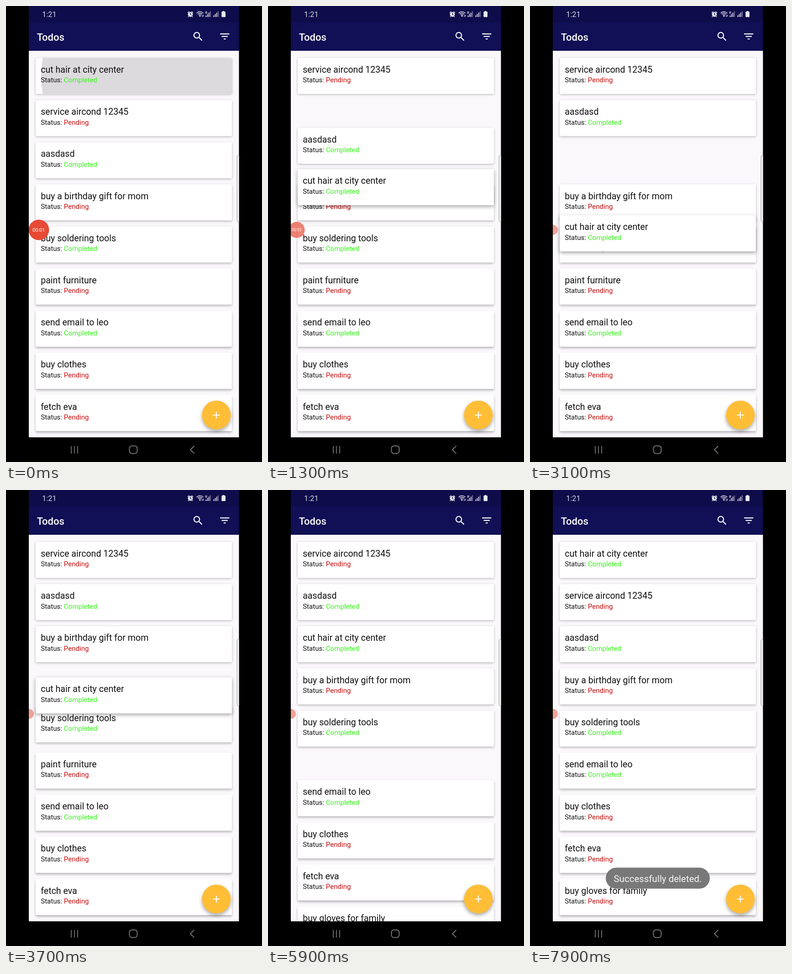
An HTML page with a canvas that plays this animation: 561x998 px, repeating every 8 s.

```html
<!DOCTYPE html>
<html lang="en">
<head>
<meta charset="utf-8">
<title>Todos</title>
<style>
html, body { margin: 0; width: 100%; height: 100%; overflow: hidden; background: #000; }
canvas { display: block; width: 561px; height: 998px; }
</style>
</head>
<body>
<canvas id="stage"></canvas>
<script>
const W = 561, H = 998, LOOP = 8000, STEP = 100;
const LEFT = 50, RIGHT = 510.5, LIST_TOP = 98, LIST_BOTTOM = 944;
const CARD = { x: 65, w: 430, h: 79, first: 113.6, pitch: 92.2 };
const FONT = 'Roboto, "Noto Sans", sans-serif';

const canvas = document.getElementById('stage');
const ctx = canvas.getContext('2d');
const dpr = window.devicePixelRatio || 1;
canvas.width = W * dpr;
canvas.height = H * dpr;

const todos = [
  ['cut hair at city center', true],
  ['service aircond 12345', false],
  ['aasdasd', true],
  ['buy a birthday gift for mom', false],
  ['buy soldering tools', true],
  ['paint furniture', false],
  ['send email to leo', true],
  ['buy clothes', false],
  ['fetch eva', false],
  ['buy gloves for family', false]
];
const DELETED = 5, DELETE_AT = 5800, RELOAD_AT = 7500;

// Top of the dragged card over time: [ms, y]
const dragPath = [
  [500, 113.6], [800, 150], [1000, 215], [1200, 302], [1300, 357], [1600, 530],
  [1850, 645], [2050, 690], [2300, 541], [2550, 385], [2700, 310], [2850, 280],
  [3000, 365], [3100, 458], [3300, 550], [3450, 540], [3700, 410], [3950, 310], [4200, 298]
];
// A neighbour makes room: [ms, item, direction]
const swaps = [
  [1000, 1, -1], [1200, 2, -1], [1400, 3, -1], [1550, 4, -1], [1700, 5, -1], [1800, 6, -1],
  [2320, 6, 1], [2430, 5, 1], [2520, 4, 1], [2650, 3, 1],
  [3120, 3, -1], [3250, 4, -1], [3500, 4, 1], [3700, 3, 1]
];

const clamp = v => Math.max(0, Math.min(1, v));
const ramp = (t, from, to) => clamp((t - from) / (to - from));
const ease = p => 0.5 - 0.5 * Math.cos(Math.PI * p);
const slotY = n => CARD.first + n * CARD.pitch;

// Cubic Hermite through the points, flat at both ends
function along(points, t) {
  const last = points.length - 1;
  if (t <= points[0][0]) return points[0][1];
  if (t >= points[last][0]) return points[last][1];
  let i = 0;
  while (t > points[i + 1][0]) i++;
  const slope = k => k === 0 || k === last ? 0 :
    (points[k + 1][1] - points[k - 1][1]) / (points[k + 1][0] - points[k - 1][0]);
  const [t0, y0] = points[i], [t1, y1] = points[i + 1];
  const d = t1 - t0, u = (t - t0) / d, u2 = u * u, u3 = u2 * u;
  return (2 * u3 - 3 * u2 + 1) * y0 + (u3 - 2 * u2 + u) * d * slope(i) +
    (3 * u2 - 2 * u3) * y1 + (u3 - u2) * d * slope(i + 1);
}

function text(s, x, y, size, color, weight = 400, align = 'left') {
  ctx.font = `${weight} ${size}px ${FONT}`;
  ctx.fillStyle = color;
  ctx.textAlign = align;
  ctx.fillText(s, x, y);
}

function rect(x, y, w, h, color) {
  ctx.fillStyle = color;
  ctx.fillRect(x, y, w, h);
}

function roundPath(x, y, w, h, r) {
  ctx.beginPath();
  ctx.roundRect(x, y, w, h, r);
}

function disc(x, y, r, color) {
  ctx.beginPath();
  ctx.arc(x, y, r, 0, 2 * Math.PI);
  ctx.fillStyle = color;
  ctx.fill();
}

function line(points, width, color) {
  ctx.beginPath();
  points.forEach(([x, y], i) => i ? ctx.lineTo(x, y) : ctx.moveTo(x, y));
  ctx.lineWidth = width;
  ctx.strokeStyle = color;
  ctx.stroke();
}

function shadow(alpha, blur, dy) {
  ctx.shadowColor = `rgba(0,0,0,${alpha})`;
  ctx.shadowBlur = blur * dpr;
  ctx.shadowOffsetY = dy * dpr;
}

function icon(path, x, y) {
  ctx.save();
  ctx.translate(x, y);
  ctx.scale(1.12, 1.12);
  ctx.fillStyle = '#fff';
  ctx.fill(path);
  ctx.restore();
}

const searchIcon = new Path2D('M15.5 14h-.79l-.28-.27A6.47 6.47 0 0 0 16 9.5 6.5 6.5 0 1 0 9.5 16c1.61 0 3.09-.59 4.23-1.57l.27.28v.79l5 4.99L20.49 19l-4.99-5zm-6 0C7.01 14 5 11.99 5 9.5S7.01 5 9.5 5 14 7.01 14 9.5 11.99 14 9.5 14z');
const filterIcon = new Path2D('M10 18h4v-2h-4v2zM3 6v2h18V6H3zm3 7h12v-2H6v2z');

function drawCard(i, x, y, lift = 0, ripple) {
  const [title, done] = todos[i];
  ctx.save();
  shadow(0.27 + 0.1 * lift, 5 + 4 * lift, 0.8 + y * 0.0032 + lift);
  roundPath(x, y, CARD.w, CARD.h, 2.5);
  ctx.fillStyle = '#fff';
  ctx.fill();
  ctx.restore();
  if (ripple) ripple(x, y);
  text(title, x + 11.2, y + 32.4, 19.6, '#111');
  text('Status: ', x + 11.2, y + 53.7, 15.1, '#111');
  const w = ctx.measureText('Status: ').width;
  text(done ? 'Completed' : 'Pending', x + 11.2 + w, y + 53.7, 15.1, done ? '#38f51c' : '#c80a0a');
}

function drawRipple(t, x, y) {
  const alpha = 1 - ramp(t, 400, 700);
  if (!alpha) return;
  ctx.save();
  roundPath(x, y, CARD.w, CARD.h, 2.5);
  ctx.clip();
  ctx.globalAlpha = alpha;
  disc(306, y + 40, 229 + t * 0.25, '#dcdadd');
  ctx.restore();
}

function drawList(t) {
  const reloaded = t >= RELOAD_AT;
  const closing = reloaded ? 1 : ease(ramp(t, DELETE_AT, DELETE_AT + 250));
  ctx.save();
  ctx.beginPath();
  ctx.rect(LEFT, LIST_TOP, RIGHT - LEFT, LIST_BOTTOM - LIST_TOP);
  ctx.clip();
  for (let i = 1; i < todos.length; i++) {
    let pos = i;
    if (!reloaded) {
      for (const [at, item, dir] of swaps) {
        if (item === i) pos += dir * ease(ramp(t, at, at + 250));
      }
    }
    if (i > DELETED) pos -= closing;
    let x = CARD.x;
    if (i === DELETED) {
      const p = ramp(t, 5200, 5700);
      if (p === 1) continue;
      x -= 450 * p * p;
    }
    drawCard(i, x, slotY(pos));
  }
  const lift = reloaded ? 0 : ramp(t, 400, 600) * (1 - ramp(t, 4050, 4300));
  drawCard(0, CARD.x, reloaded ? slotY(0) : along(dragPath, t), lift, (x, y) => drawRipple(t, x, y));
  ctx.restore();
}

function drawStatusBar() {
  const ink = '#e8e8f2', back = '#0f0c4b';
  rect(LEFT, 0, RIGHT - LEFT, 36, back);
  text('1:21', 79.3, 24, 16.2, '#dcdce8');

  // alarm
  disc(404, 18.3, 5.4, ink);
  line([[398, 15], [401.5, 12]], 1.6, ink);
  line([[406.5, 12], [410, 15]], 1.6, ink);
  line([[400.5, 22.5], [398.8, 24.2]], 1.4, ink);
  line([[407.5, 22.5], [409.2, 24.2]], 1.4, ink);
  line([[404, 15], [404, 18.6], [406.5, 20]], 1.3, back);

  // wifi
  for (const r of [3.5, 6.7, 9.9]) {
    ctx.beginPath();
    ctx.arc(425, 22.5, r, -Math.PI * 0.76, -Math.PI * 0.24);
    ctx.lineWidth = 1.5;
    ctx.strokeStyle = ink;
    ctx.stroke();
  }
  disc(425, 22, 1.5, ink);
  line([[430, 20], [430, 24]], 1.2, ink);
  line([[432.5, 19], [432.5, 23]], 1.2, ink);

  // signal and battery
  text('R', 436.5, 16.5, 7.5, ink, 500);
  for (let i = 0; i < 4; i++) {
    const h = 3.5 + i * 3;
    const color = i < 3 ? ink : '#8583a8';
    rect(437.5 + i * 3.2, 24 - (i ? h : 3), 1.7, i ? h : 3, color);
    rect(454.5 + i * 3.2, 24 - h, 1.7, h, color);
  }
  rect(474.8, 11, 3.6, 2, ink);
  roundPath(472.4, 12.3, 8.6, 12, 1.2);
  ctx.fillStyle = ink;
  ctx.fill();
}

function drawToolbar() {
  rect(LEFT, 35.5, RIGHT - LEFT, LIST_TOP - 35.5, '#110f55');
  text('Todos', 67.8, 75.5, 22, '#fff', 500);
  icon(searchIcon, 407.4, 53.4);
  icon(filterIcon, 465.8, 53.2);
}

function drawEdgeHandle() {
  roundPath(506.3, 326.5, 10, 146, 5);
  ctx.save();
  ctx.beginPath();
  ctx.rect(LEFT, 320, RIGHT - LEFT, 160);
  ctx.clip();
  roundPath(506.3, 326.5, 10, 146, 4);
  ctx.fillStyle = '#f4f3f5';
  ctx.fill();
  ctx.lineWidth = 1.2;
  ctx.strokeStyle = '#a3a2a6';
  ctx.stroke();
  ctx.restore();
}

function drawFab() {
  ctx.save();
  shadow(0.35, 8, 4);
  disc(461, 895.2, 31.5, '#ffbe36');
  ctx.restore();
  line([[453.4, 895.3], [468.6, 895.3]], 2.1, '#fff');
  line([[461, 887.7], [461, 902.9]], 2.1, '#fff');
}

function drawNavBar() {
  const ink = '#747474';
  rect(LEFT, LIST_BOTTOM, RIGHT - LEFT, H - LIST_BOTTOM, '#000');
  for (const x of [143, 150, 157]) line([[x, 963], [x, 979.5]], 1.8, ink);
  roundPath(270.5, 962.7, 17, 16.8, 5.5);
  ctx.lineWidth = 2;
  ctx.strokeStyle = ink;
  ctx.stroke();
  line([[412.5, 963], [404, 971.2], [412.5, 979.4]], 2, ink);
}

function drawTimer(t) {
  const p = ramp(t, 1100, 1580);
  const x = 72 - 22 * p, r = 22.5 - 11.5 * p;
  const seconds = t < 200 ? 1 : t < 1200 ? 2 : 3;
  ctx.save();
  ctx.beginPath();
  ctx.rect(LEFT, 440, 100, 100);
  ctx.clip();
  ctx.globalAlpha = 1 - 0.5 * Math.min(1, p * 1.5);
  disc(x, 490, r, '#e64a35');
  ctx.globalAlpha = Math.min(1, 2 * (1 - p));
  text('00:0' + seconds, x - 0.3, 490 + 3.9 * r / 22.5, 11 * r / 22.5, '#fff', 400, 'center');
  ctx.restore();
}

function drawToast(t) {
  if (t < RELOAD_AT) return;
  ctx.save();
  ctx.globalAlpha = ramp(t, RELOAD_AT - 100, RELOAD_AT + 300);
  roundPath(166, 826.5, 228, 46, 23);
  ctx.fillStyle = '#787878';
  ctx.fill();
  text('Successfully deleted.', 280, 857.5, 20.5, '#f6f6f6', 400, 'center');
  ctx.restore();
}

function draw(t) {
  ctx.setTransform(dpr, 0, 0, dpr, 0, 0);
  rect(0, 0, W, H, '#000');
  rect(LEFT, LIST_TOP, RIGHT - LEFT, LIST_BOTTOM - LIST_TOP, '#faf8fb');
  drawList(t);
  drawStatusBar();
  drawToolbar();
  drawEdgeHandle();
  drawFab();
  drawNavBar();
  drawTimer(t);
  drawToast(t);
}

let start;
function tick(now) {
  if (start === undefined) start = now;
  const t = Math.max(0, now - start) % LOOP;
  draw(Math.floor(t / STEP) * STEP);
  requestAnimationFrame(tick);
}
draw(0);
requestAnimationFrame(tick);
</script>
</body>
</html>
```
